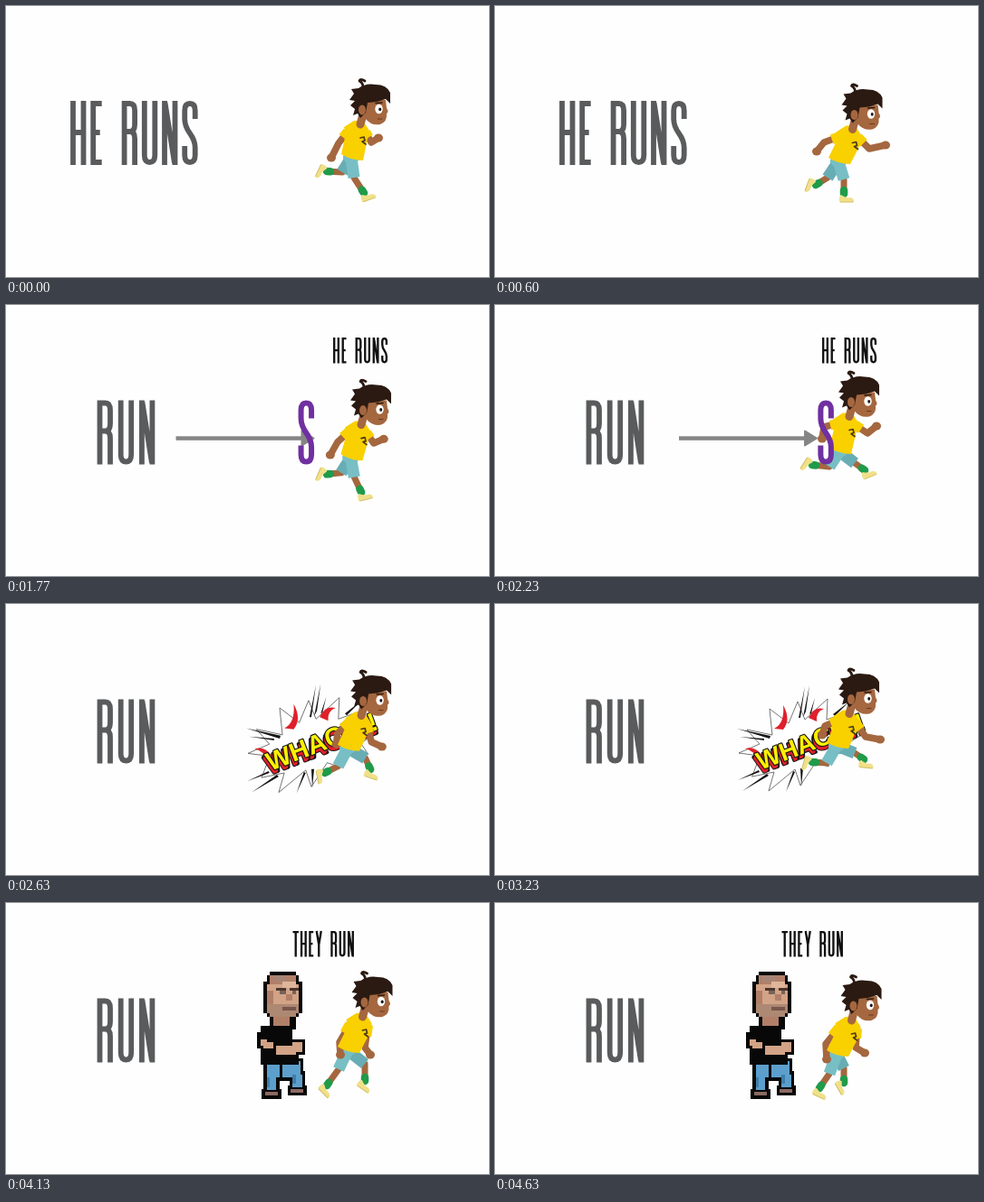
These frames come from a looping animation (533 px wide and 300 px high, 4.71 s). An HTML page with a canvas:

```html
<!DOCTYPE html>
<html lang="en">
<head>
<meta charset="utf-8">
<title>He runs, they run</title>
<style>
html, body { margin: 0; width: 100%; height: 100%; overflow: hidden; background: #fefefe; }
canvas { display: block; width: 533px; height: 300px; }
</style>
</head>
<body>
<canvas id="stage" width="533" height="300" role="img" aria-label="HE RUNS, RUN, THEY RUN"></canvas>
<script>
const ctx = document.getElementById('stage').getContext('2d');
const LOOP = 4710;
const SKIN = '#a5673f', HAIR = '#2b1a12', YELLOW = '#f9d000', TEAL = '#77bfc4', DARK_TEAL = '#68adb4',
      GREEN = '#1f9b4a', SHOE = '#f0e08a', GREY = '#595b5c', PURPLE = '#7030a0';

const mix = (a, b, k) => a + (b - a) * k;
const clamp = k => Math.max(0, Math.min(1, k));

function line(points, color, width, cap = 'round') {
  ctx.beginPath();
  points.forEach(([x, y]) => ctx.lineTo(x, y));
  ctx.strokeStyle = color;
  ctx.lineWidth = width;
  ctx.lineCap = cap;
  ctx.lineJoin = 'round';
  ctx.stroke();
}
function fill(d, color) {
  ctx.fillStyle = color;
  ctx.fill(new Path2D(d));
}
function oval(x, y, rx, ry, color, turn = 0) {
  ctx.beginPath();
  ctx.ellipse(x, y, rx, ry, turn, 0, 7);
  ctx.fillStyle = color;
  ctx.fill();
}

// Condensed lettering: centre lines in a 71 px tall box, with advance widths.
const GLYPHS = {
  H: ['M3 0V71M14.5 0V71M3 35H14.5', 22.5],
  E: ['M12.5 3H3V68H12.5M3 35H10.5', 18],
  R: ['M3 71V3H9Q14.5 3 14.5 11V26Q14.5 34 9 34H3M9 34Q14.5 34 14.5 42V71', 22.5],
  U: ['M3 0V60Q3 68 8.75 68T14.5 60V0', 22.5],
  N: ['M3 71V0M3.5 2L14 69M14.5 71V0', 22.5],
  S: ['M14.5 20V11Q14.5 3 8.75 3T3 11V20Q3 28 8.75 36T14.5 52V60Q14.5 68 8.75 68T3 60V50', 22.5],
  T: ['M0 3H16M8 3V71', 20],
  Y: ['M2.5 0L8.75 38L15 0M8.75 36V71', 22.5],
  ' ': ['', 17]
};
function word(text, x, y, height, color, weight = 5.8, tracking = 0) {
  ctx.save();
  ctx.translate(x, y);
  ctx.scale(height / 71, height / 71);
  ctx.strokeStyle = color;
  ctx.lineWidth = weight;
  ctx.lineCap = 'butt';
  ctx.lineJoin = 'miter';
  for (const ch of text) {
    const [d, advance] = GLYPHS[ch];
    ctx.stroke(new Path2D(d));
    ctx.translate(advance + tracking, 0);
  }
  ctx.restore();
}

// Half a stride: phase, [head dx, dy, hip x, y], leg A, leg B [knee, ankle, shoe angle],
// arm A, arm B [elbow, hand]. A and B trade places at the end.
const HALF = 5.5;
const POSES = [
  [0, [0, 0, 381, 168], [384, 190, 395, 207, -20], [371, 184, 354, 183, 115], [403, 151, 411, 146], [367, 152, 359, 168]],
  [.5, [3.5, 5.5, 379, 172], [385, 192, 385, 208, 0], [367, 190, 354, 198, 110], [413, 158, 431, 154], [363, 151, 355, 161]],
  [2, [2.5, -1, 377, 167], [369, 189, 358, 205, 25], [385, 183, 385, 199, 60], [365, 156, 366, 173], [398, 160, 408, 166]],
  [2.5, [2.5, -5, 377, 163], [367, 184, 354, 202, 45], [396, 178, 396, 197, 35], [368, 154, 369, 168], [396, 160, 402, 168]],
  [3.9, [0, -9.5, 377, 157], [366, 176, 350, 175, 105], [397, 165, 407, 172, 5], [364, 135, 361, 145], [409, 147, 425, 150]],
  [4.7, [0, -7.5, 380, 162], [369, 179, 350, 177, 122], [397, 175, 408, 183, -22], [363, 135, 361, 148], [411, 142, 421, 134]]
];
const [, body0, legA0, legB0, armA0, armB0] = POSES[0];
POSES.push([HALF, body0, legB0, legA0, armB0, armA0]);

const TICKS = [0, 6, 13, 22, 32, 41, 46];
const STRIDE = [0, 6, 13, 21.2, 31.4, 41, 46];

function boyPose(t) {
  const tick = Math.floor((t < 1230 ? t : t - 30) / 100 + 1e-6);
  let i = 0;
  while (i < TICKS.length - 2 && tick >= TICKS[i + 1]) i++;
  const k = (tick - TICKS[i]) / (TICKS[i + 1] - TICKS[i]);
  const phase = (mix(STRIDE[i], STRIDE[i + 1], k) + 1e-6) % HALF;
  const j = POSES.findIndex(p => p[0] > phase);
  const a = POSES[j - 1], b = POSES[j];
  const part = (phase - a[0]) / (b[0] - a[0]);
  return a.slice(1).map((nums, n) => nums.map((v, m) => mix(v, b[n + 1][m], part)));
}

function leg(hipX, hipY, [kx, ky, ax, ay, deg], color) {
  line([[kx, ky], [ax, ay]], SKIN, 7);
  const len = Math.hypot(kx - ax, ky - ay) || 1;
  line([[ax, ay], [ax + (kx - ax) / len * 4, ay + (ky - ay) / len * 4]], GREEN, 8.5);
  ctx.save();
  ctx.translate(ax, ay);
  ctx.rotate(deg * Math.PI / 180);
  fill('M-5 9Q-6 3 -3 1Q3 5 7 4Q12 5 11 9Z', SHOE);
  line([[-4, 9], [10.5, 9]], '#d3bd61', 1, 'butt');
  ctx.restore();
  line([[hipX, hipY], [kx, ky]], color, 13, 'butt');
  oval(hipX, hipY, 9, 6.5, color);
}

function arm(sx, sy, [ex, ey, hx, hy]) {
  line([[sx, sy], [ex, ey], [hx, hy]], SKIN, 7.5);
  oval(hx, hy, 5, 4.5, SKIN);
  line([[sx, sy], [mix(sx, ex, .5), mix(sy, ey, .5)]], YELLOW, 11, 'butt');
}

function head(dx, dy) {
  ctx.save();
  ctx.translate(dx, dy);
  line([[394, 120], [391, 131]], SKIN, 9);
  fill('M391 104H419L420 113Q423 117 420 119Q421 128 413 131Q403 133 396 124Z', SKIN);
  fill('M380 110L385 105L379 104L384 97L381 92L389 91Q397 85 408 87Q420 87 424 96L424 108L419 103L409 106L399 107L397 118L391 124L388 119L383 121L385 114Z', HAIR);
  oval(393, 115, 4, 5.5, SKIN);
  oval(411.5, 114, 4.2, 5.2, '#fff');
  oval(412.7, 114.3, 1.5, 1.9, '#211611');
  line([[408, 107.5], [415, 107]], HAIR, 1.5);
  line([[410, 125], [415, 125]], '#68391f', 1);
  ctx.strokeStyle = HAIR;
  ctx.lineWidth = 2.8;
  ctx.stroke(new Path2D('M394 90Q394 85 390 83Q391 80 396 83'));
  ctx.restore();
}

function boy(t) {
  const [[dx, dy, hx, hy], legA, legB, armA, armB] = boyPose(t);
  const nx = 390 + dx, ny = 129 + dy;
  const reach = a => a[2] > nx ? [nx + 7, ny + 11] : [nx - 13, ny + 10];
  leg(hx, hy, legB, DARK_TEAL);
  leg(hx, hy, legA, TEAL);
  arm(...reach(armA), armA);
  arm(...reach(armB), armB);
  fill(`M${nx - 6} ${ny - 2}L${nx + 4} ${ny - 2}L${nx + 11} ${ny + 9}L${nx + 8} ${ny + 22}L${hx + 13} ${hy + 3}Q${hx} ${hy + 3} ${hx - 11} ${hy - 4}L${nx - 15} ${ny + 12}L${nx - 17} ${ny + 5}Z`, YELLOW);
  const px = nx + 4, py = ny + 20;
  line([[px - 3, py - 3], [px + 1, py - 4], [px + 2, py], [px - 1, py + 1], [px + 3, py + 4]], '#4d3b16', 1.7);
  head(dx, dy);
}

// Blocky runner; each cell is CELL px.
const CELL = 3.55;
function cells(color, x, y, w, h) {
  const left = Math.round(x * CELL), top = Math.round(y * CELL);
  ctx.fillStyle = color;
  ctx.fillRect(left, top, Math.round((x + w) * CELL) - left, Math.round((y + h) * CELL) - top);
}
function outlined(parts) {
  parts.forEach(([, ...r]) => cells('#080808', ...r));
  parts.forEach(([c, x, y, w, h]) => cells(c, x + 1, y + 1, w - 2, h - 2));
}
// Rear shift, rear lift, front shift, front lift, arm swing, bob.
const MAN_POSES = [
  [0, 0, 3, 1, 0, 0],
  [-4, 1, 1, 0, 1, 0],
  [-8, 5, 2, 0, 2, -1],
  [-4.5, 3, 1, 0, 1, 0]
];
function manLeg(x, shift, lift) {
  const jeans = '#5d9fcc', foot = x + shift;
  outlined([
    [jeans, x + Math.min(0, shift / 2), 27, 6 + Math.abs(shift) / 2, 7],
    [jeans, foot, 32 - lift, 5, 6],
    ['#8b6962', foot - .5, 36.5 - lift, 6, 3.2]
  ]);
  cells('#3f7eab', foot + 1, 33 - lift, 1, 3);
}
function man(t) {
  const step = Math.floor((t % 500) / 100);
  const [rear, rearLift, front, frontLift, swing, bob] = MAN_POSES[step === 0 ? 3 : step - 1];
  const skin = '#d2a386', shade = '#b17f68', dark = '#4b352e';
  ctx.save();
  ctx.translate(277, 76);
  manLeg(2, rear, rearLift);
  manLeg(7, front, frontLift);
  ctx.translate(0, Math.round(bob * CELL));
  cells('#080808', 4, 13, 8, 5);
  cells(shade, 5, 14, 5, 3);
  cells('#080808', 1, 17, 10, 12);
  cells('#080808', 0, 19, 11, 5);
  cells('#080808', 2, 27, 11, 2);
  cells('#080808', 4, 0, 8, 1);
  cells('#080808', 3, 1, 10, 13);
  cells('#080808', 2, 3, 12, 10);
  cells(shade, 4, 1, 8, 3);
  cells(skin, 3, 4, 10, 6);
  cells('#a78475', 5, 1, 4, 2);
  cells('#dfb69a', 8, 3, 4, 2);
  cells(shade, 3, 6, 2, 5);
  cells('#ad8873', 3, 10, 10, 3);
  cells('#ad8873', 4, 13, 8, 1);
  cells(dark, 6, 5, 3, 1);
  cells(dark, 10, 5, 3, 1);
  cells('#766357', 7, 6, 2, 1);
  cells('#766357', 11, 6, 1, 1);
  cells(shade, 9, 7, 2, 2);
  cells('#77564a', 8, 11, 4, 1);
  outlined([[skin, 0 - swing, 20, 4, 4], [skin, 1 - swing, 21, 7, 4]]);
  outlined([[skin, 5 + swing, 22, 8, 5], [skin, 10 + swing, 21, 5, 5]]);
  ctx.restore();
}

function arrow(t) {
  const x = 175 + (t - 1400) * 28 / 830, tip = x + 153;
  ctx.save();
  ctx.globalAlpha = clamp(.55 + (t - 1400) / 730);
  ctx.fillStyle = ctx.strokeStyle = '#858585';
  ctx.fillRect(x, 145.3, 142, 4.5);
  ctx.lineWidth = 2;
  ctx.lineJoin = 'round';
  const tri = new Path2D(`M${tip - 14} 139.5L${tip - 1} 147.5L${tip - 14} 155.5Z`);
  ctx.fill(tri);
  ctx.stroke(tri);
  ctx.restore();
}

function burst(t) {
  const size = mix(1.3, 1, 1 - Math.pow(1 - clamp((t - 2430) / 370), 3));
  ctx.save();
  ctx.translate(338, 152);
  ctx.scale(size, size);
  ctx.translate(-338, -152);
  const star = 'M292 168L269 165L292 155L278 139L306 145L303 116L324 132L334 108L342 128L367 105L366 128L391 119L383 137L409 142L390 154L398 166L373 165L368 180L354 175L337 201L331 183L302 207L308 186L284 191Z';
  fill(star, '#fff');
  ctx.strokeStyle = '#555';
  ctx.lineWidth = .8;
  ctx.stroke(new Path2D(star));
  fill('M318 112Q327 128 318 139L308 138Q320 132 318 112ZM346 126Q351 113 363 116Q354 119 355 130ZM276 160Q287 157 294 167L291 174Q286 162 276 160Z', '#df202b');
  fill('M342 91L337 126L335 126ZM347 90L343 119L340 125ZM353 104L349 121L347 122ZM267 138L304 146L303 149ZM270 147L297 149L297 151ZM391 108L375 124L373 122ZM268 195L291 184L292 186ZM273 207L300 188L302 190ZM338 202L337 182L340 182ZM321 208L329 185L331 186Z', '#151515');
  ctx.translate(293, 184);
  ctx.rotate(-.37);
  ctx.font = '900 28px "Liberation Sans", Arial, sans-serif';
  ctx.lineJoin = 'round';
  ctx.lineWidth = 4;
  ctx.strokeStyle = '#151515';
  ctx.strokeText('WHACK!!', -2, 3);
  ctx.fillStyle = '#df202b';
  for (let d = 4; d > 0; d--) ctx.fillText('WHACK!!', -d * .7, d);
  ctx.lineWidth = 2.2;
  ctx.strokeText('WHACK!!', 0, 0);
  ctx.fillStyle = '#fff000';
  ctx.fillText('WHACK!!', 0, 0);
  ctx.restore();
}

function draw(t) {
  ctx.fillStyle = '#fefefe';
  ctx.fillRect(0, 0, 533, 300);
  if (t < 700) word('HE RUNS', 71, 105, 71, GREY, 5.8, -.3);
  else word('RUN', 100.5, 105.5, 71, GREY, 5.8, .7);
  if (t >= 700 && t < 2430) word('HE RUNS', 361, 36, 28.5, '#111', 5.8, 1.2);
  if (t >= 3330) word('THEY RUN', 316.5, 31, 28.5, '#111', 5.8, .8);
  const sliding = t >= 1230 && t < 2430;
  if (sliding) arrow(t);
  if (t >= 2430 && t < 3330) burst(t);
  if (t >= 3330) man(t);
  boy(t);
  if (sliding) word('S', 295.3 + (t - 1400) * 61 / 830, 105.5, 71, PURPLE, 6);
}

const start = performance.now();
function frame() {
  draw((performance.now() - start) % LOOP);
  requestAnimationFrame(frame);
}
frame();
</script>
</body>
</html>
```
